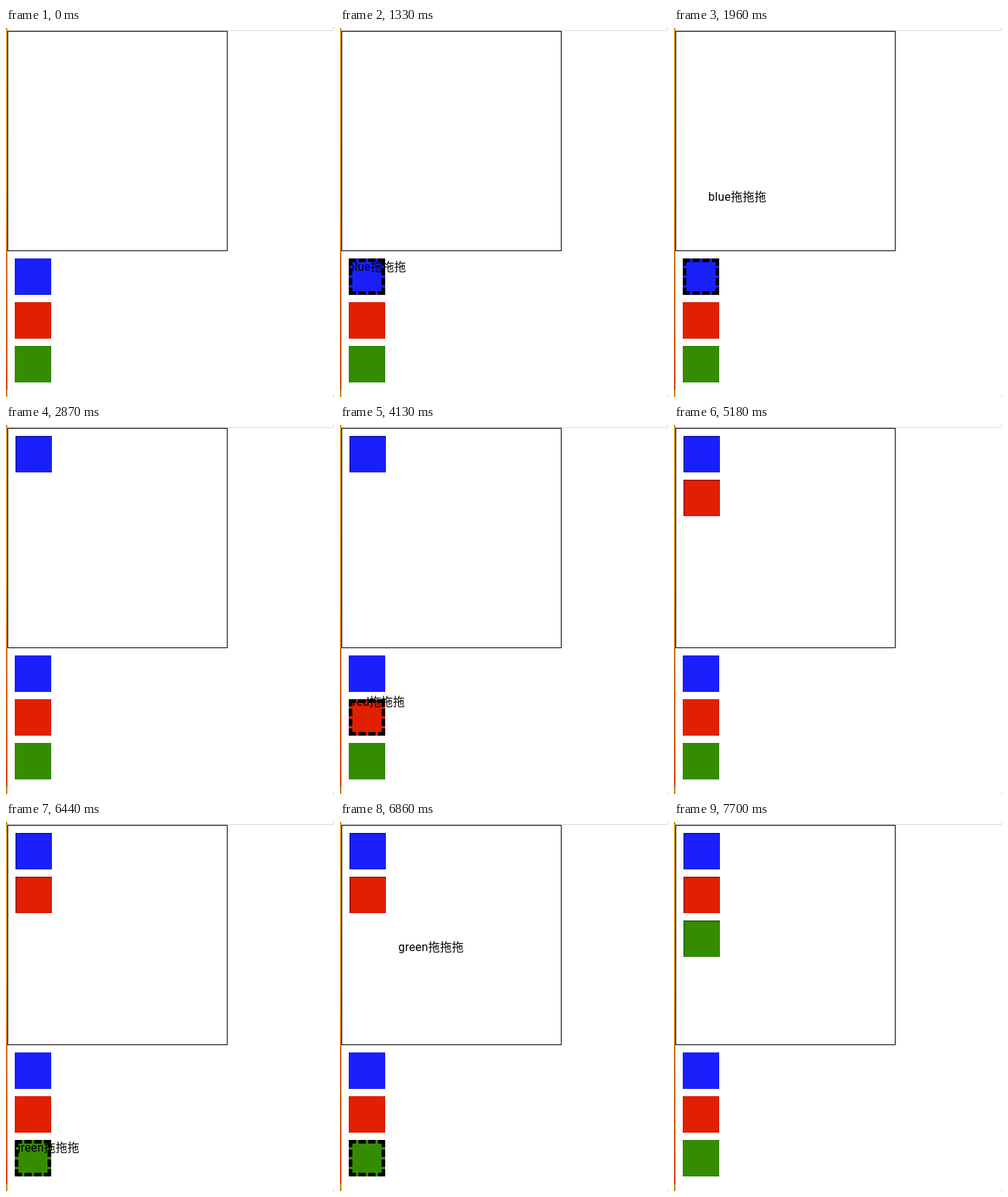
An HTML page for the animation above (9.66 s loop, 450 by 506 pixels).

```html
<!DOCTYPE html>
<html lang="zh">
<head>
<meta charset="utf-8">
<title>Drag and drop</title>
<style>
  html, body { margin: 0; width: 100%; height: 100%; overflow: hidden; background: #fff; }
  body { position: relative; }
  div { position: absolute; box-sizing: border-box; }
  #edge { left: 0; top: 0; width: 2px; height: 506px;
    background: linear-gradient(#cf9512, #cc8410 45%, #cf6010 75%, #d2440e 98%, #c08a20 98%); }
  #line { left: 2px; top: 3px; width: 448px; height: 1px; background: #dcdcdc; }
  #zone { left: 2px; top: 4px; width: 302px; height: 302px; border: 1px solid #000; }
  .corner { right: 0; width: 1px; height: 1px; background: #777; }
  .box { width: 50px; height: 50px; box-shadow: inset 0 0 1px rgba(0, 0, 0, .5); }
  .copy { left: 13px; box-shadow: inset 1px 1px 2px rgba(0, 0, 0, .5); }
  .drag { border: 5px dashed #000; box-shadow: none; }
  .label { left: 0; top: 0; white-space: nowrap; color: #000; letter-spacing: .2px;
    font: 16px/24px Roboto, "Noto Sans CJK SC", "Noto Sans CJK", sans-serif; }
</style>
</head>
<body>
<div id="edge"></div>
<div id="line"></div>
<div id="zone"></div>
<div class="corner" style="top: 0"></div>
<div class="corner" style="bottom: 0"></div>
<script>
const LOOP = 9660, STEP = 70;

// path points: [step, left, middle]
const items = [
  { name: 'blue', color: '#1a20fb', start: 1330, drop: 2870,
    path: [[0, 11, 328], [6, 64, 273], [9, 47, 232], [13, 10, 166], [16, 37, 136]] },
  { name: 'red', color: '#e02000', start: 4060, drop: 5180,
    path: [[0, 11, 388], [5, 66, 265], [8, 52, 171], [12, 33, 129]] },
  { name: 'green', color: '#358c00', start: 6440, drop: 7700,
    path: [[0, 11, 447], [4, 101, 270], [7, 73, 150]] }
];

function add(cls, color, top) {
  const el = document.createElement('div');
  el.className = cls;
  if (color) el.style.background = color;
  if (top !== undefined) el.style.top = top + 'px';
  document.body.append(el);
  return el;
}

items.forEach((it, i) => {
  it.box = add('box', it.color, 316 + 60 * i);
  it.box.style.left = '12px';
  it.copy = add('box copy', it.color, 15 + 60 * i);
});
for (const it of items) {
  it.label = add('label');
  it.label.textContent = it.name + '拖拖拖';
}

const slope = (p, i, k) => (p[i + 1][k] - p[i][k]) / (p[i + 1][0] - p[i][0]);

// flat at the ends and at turning points
function tangent(p, i, k) {
  if (i === 0 || i === p.length - 1) return 0;
  const a = slope(p, i - 1, k), b = slope(p, i, k);
  return a * b <= 0 ? 0 : 2 * a * b / (a + b);
}

function along(p, s, k) {
  s = Math.min(s, p[p.length - 1][0]);
  let i = 0;
  while (i < p.length - 2 && s > p[i + 1][0]) i++;
  const h = p[i + 1][0] - p[i][0], u = (s - p[i][0]) / h, v = 1 - u;
  return p[i][k] * v * v * (1 + 2 * u) + p[i + 1][k] * u * u * (3 - 2 * u)
    + h * u * v * (v * tangent(p, i, k) - u * tangent(p, i + 1, k));
}

const show = (el, on) => { el.style.visibility = on ? 'visible' : 'hidden'; };

function draw(t) {
  for (const it of items) {
    const dragging = t >= it.start && t < it.drop;
    it.box.classList.toggle('drag', dragging);
    show(it.copy, t >= it.drop);
    show(it.label, dragging);
    if (dragging) {
      const s = Math.floor((t - it.start) / STEP);
      const x = Math.round(along(it.path, s, 1)), y = Math.round(along(it.path, s, 2));
      it.label.style.transform = `translate(${x}px, ${y - 12}px)`;
    }
  }
}

function frame() {
  draw(performance.now() % LOOP);
  requestAnimationFrame(frame);
}
frame();
</script>
</body>
</html>
```
